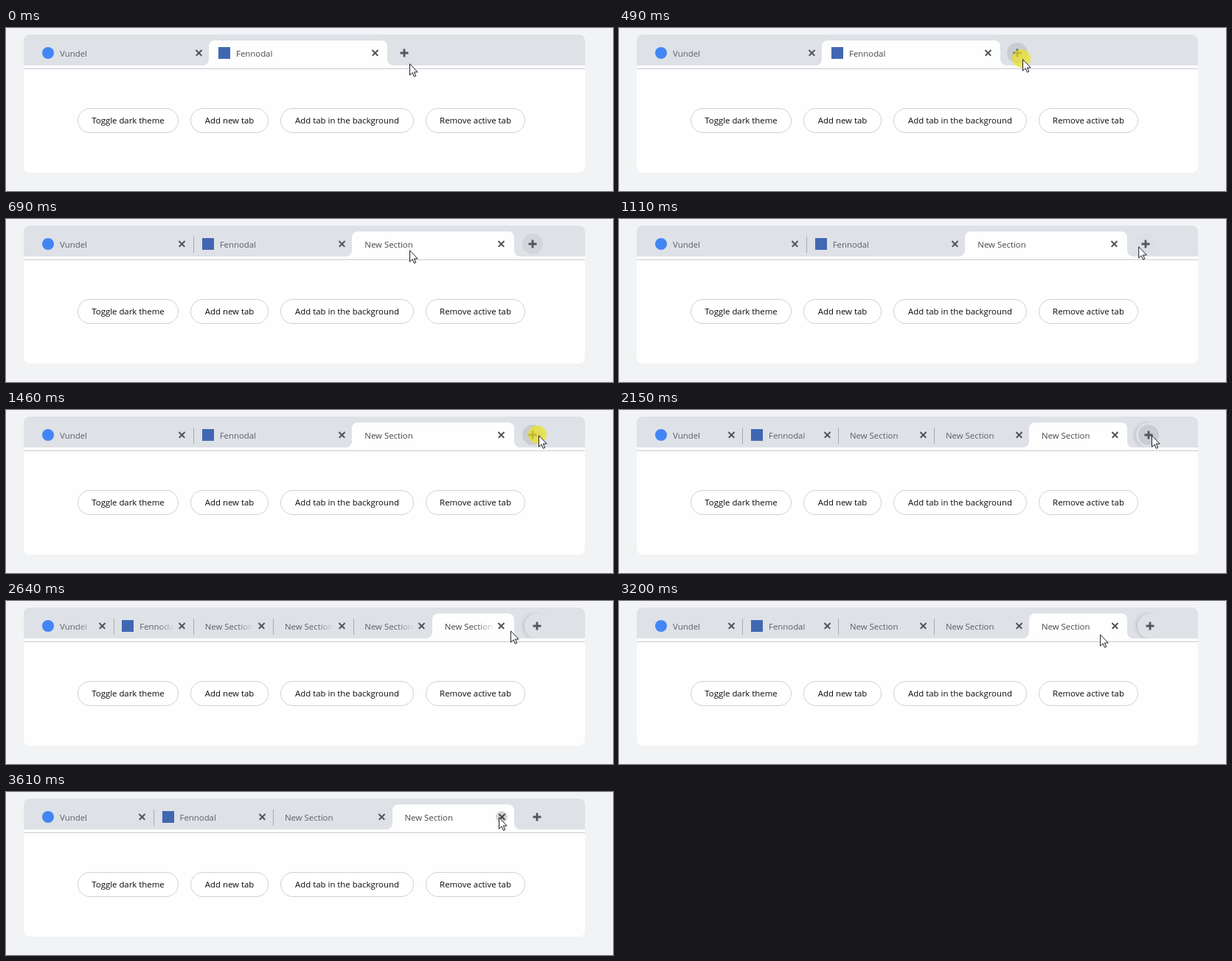
Recreate the animation shown at these times as an HTML page. Size 823 by 222 pixels, loop 3680 ms.

```html
<!DOCTYPE html>
<html lang="en">
<head>
<meta charset="utf-8">
<title>Browser tabs</title>
<style>
  @property --n { syntax: "<number>"; inherits: true; initial-value: 2; }
  @property --rise { syntax: "<length>"; inherits: true; initial-value: 0px; }

  :root { --loop: 3680ms infinite; --bar: #dee1e6; }
  html, body { margin: 0; width: 100%; height: 100%; overflow: hidden; background: #f2f3f5; }
  .stage {
    position: relative; width: 823px; height: 222px; overflow: hidden;
    font: 11.4px "Open Sans", "Noto Sans", sans-serif;
    animation: count var(--loop) step-end, rise var(--loop) linear;
  }
  .stage * { position: absolute; box-sizing: border-box; }

  .panel { left: 24px; top: 9px; width: 761px; height: 188px; border-radius: 8px; background: #fefefe; }
  .bar { left: 24px; top: 9px; width: 761px; height: 42px; border-radius: 8px 8px 0 0; background: var(--bar); }
  .line { left: 24px; top: 55px; width: 761px; height: 1px; background: #c9ccd0; }
  .strip { left: 0; top: 0; width: 823px; height: 51px; overflow: hidden; }

  /* --n tabs share the strip; the last one is always active */
  .tab {
    --s: min(239px, calc(650px / var(--n)));
    --on: clamp(0, 2 + var(--i) - var(--n), 1);
    left: calc(36px + var(--i) * var(--s)); top: 17px;
    width: calc(var(--s) + 3px); height: 34px;
    opacity: clamp(0, var(--n) - var(--i), 1);
    transform: translateY(calc(var(--on) * var(--rise)));
  }
  .bg { inset: 0; border-radius: 8px 8px 0 0; background: #fefefe; opacity: var(--on); }
  .bg::before, .bg::after {
    content: ""; position: absolute; bottom: 0; width: 8px; height: 8px;
    background: radial-gradient(circle at 0 0, transparent 7.5px, #fefefe 8.2px);
  }
  .bg::before { left: -8px; }
  .bg::after { right: -8px; transform: scaleX(-1); }
  .sep {
    left: calc(var(--s) + 1.3px); top: 7px; width: 1px; height: 22px; background: #a7abaf;
    opacity: clamp(0, var(--n) - 2 - var(--i), 1);
  }
  .label {
    --x: 17px;
    left: var(--x); top: .5px; width: calc(var(--s) - 24px - var(--x)); height: 34px;
    line-height: 34px; white-space: nowrap; overflow: hidden;
    color: rgb(calc(92 - 23 * var(--on)), calc(95 - 24 * var(--on)), calc(100 - 26 * var(--on)));
    -webkit-mask-image: linear-gradient(90deg, #000 calc(100% - 24px), transparent);
    mask-image: linear-gradient(90deg, #000 calc(100% - 24px), transparent);
  }
  .icon + .label { --x: 37px; }
  .icon { left: 13px; top: 9px; width: 16px; height: 16px; }
  .round { border-radius: 50%; background: #4285f4; }
  .square { background: #4267b2; }
  .x { left: calc(var(--s) - 14px); top: 17px; }
  .x::before, .x::after {
    content: ""; position: absolute; left: -5.5px; top: -.75px;
    width: 11px; height: 1.5px; background: #505357; transform: rotate(45deg);
  }
  .x::after { transform: rotate(-45deg); }

  .plus { top: 34px; animation: plus var(--loop) step-end; }
  .plus svg { left: -6px; top: -6px; }
  .halo {
    left: -17px; top: -17px; width: 34px; height: 34px; border-radius: 50%;
    background: var(--bar); box-shadow: -3px 0 4px rgba(0, 0, 0, .11);
    animation: halo var(--loop) step-end;
  }
  .hover {
    left: -14px; top: -14px; width: 28px; height: 28px; border-radius: 50%;
    background: rgba(0, 0, 0, .09); animation: hover var(--loop) linear;
  }
  .shut {
    left: 664px; top: 26px; width: 16px; height: 16px; border-radius: 50%;
    background: rgba(0, 0, 0, .16); animation: shut var(--loop) step-end;
  }

  .btn {
    top: 109px; height: 34px; line-height: 32px; border: 1px solid #d0d0d8; border-radius: 17px;
    background: #fff; color: #0a0a0a; text-align: center; white-space: nowrap;
  }

  .cursor { left: 0; top: 0; animation: move var(--loop) linear; }
  .cursor svg { left: 0; top: 0; overflow: visible; }
  .click {
    left: -14px; top: -13px; width: 25px; height: 25px; border-radius: 50%;
    background: rgba(236, 228, 30, .7); animation: click var(--loop) step-end;
  }

  @keyframes count {
    0% { --n: 2; } 14.67% { --n: 3; } 43.21% { --n: 4; } 54.62% { --n: 5; }
    61.96% { --n: 6; } 77.17% { --n: 5; } 97.83%, 100% { --n: 4; }
  }
  @keyframes rise {
    0%, 14.66%, 17.93%, 43.2%, 46.47%, 54.61%, 57.88%, 61.95%, 65.22%, 100% { --rise: 0px; }
    14.67%, 43.21%, 54.62%, 61.96% { --rise: 10px; }
  }
  @keyframes plus {
    0% { left: 540px; } 16.58% { left: 714px; } 45.11% { left: 716px; }
    56.25% { left: 718px; } 63.86%, 100% { left: 720px; }
  }
  @keyframes halo { 0%, 97.83%, 100% { opacity: 0; } 56.25% { opacity: 1; } }
  @keyframes hover {
    0%, 2.72%, 21.74%, 29.9%, 67.9%, 100% { opacity: 0; }
    5.43%, 16.58%, 32.6%, 65.2% { opacity: 1; }
  }
  @keyframes shut { 0%, 78.5% { opacity: 0; } 73.9%, 91.5%, 100% { opacity: 1; } }
  @keyframes click {
    0%, 14.67%, 42.9%, 56.25%, 63.6%, 77.17%, 97.83%, 100% { opacity: 0; }
    9.5%, 37.5%, 52.7%, 60%, 73.4%, 93.5% { opacity: 1; }
  }
  @keyframes move {
    0%, 1% { transform: translate(547px, 48px); }
    8.15%, 17.4%, 18.9% { transform: translate(547px, 42px); }
    20.65% { transform: translate(556px, 44px); }
    24.46% { transform: translate(604px, 44px); }
    26.4% { transform: translate(639px, 43px); }
    30.16% { transform: translate(704px, 37px); }
    33.97% { transform: translate(720px, 34px); }
    37.8%, 64.13% { transform: translate(722px, 34px); }
    66.03% { transform: translate(714px, 44px); }
    67.93% { transform: translate(704px, 47px); }
    71.74% { transform: translate(684px, 40px); }
    74.46% { transform: translate(673px, 35px); }
    77.45% { transform: translate(672px, 35px); }
    81.1% { transform: translate(652px, 45px); }
    83.15% { transform: translate(653px, 44px); }
    85%, 86.96% { transform: translate(652px, 45px); }
    92.4% { transform: translate(671px, 36px); }
    94.3%, 96.2% { transform: translate(672px, 35px); }
    97.96%, 100% { transform: translate(668px, 34px); }
  }
</style>
</head>
<body>
<div class="stage">
  <div class="panel"></div>
  <div class="bar"></div>
  <div class="line"></div>

  <div class="strip">
    <div class="plus">
      <div class="halo"></div>
      <div class="hover"></div>
      <svg width="12" height="12" viewBox="-6 -6 12 12"><path d="M-5.5 0H5.5M0-5.5V5.5" stroke="#54575b" stroke-width="2.8"/></svg>
    </div>
    <div class="tab" style="--i:0"><div class="bg"></div><div class="icon round"></div><div class="label">Vundel</div><div class="x"></div><div class="sep"></div></div>
    <div class="tab" style="--i:1"><div class="bg"></div><div class="icon square"></div><div class="label">Fennodal</div><div class="x"></div><div class="sep"></div></div>
    <div class="tab" style="--i:2"><div class="bg"></div><div class="label">New Section</div><div class="x"></div><div class="sep"></div></div>
    <div class="tab" style="--i:3"><div class="bg"></div><div class="label">New Section</div><div class="x"></div><div class="sep"></div></div>
    <div class="tab" style="--i:4"><div class="bg"></div><div class="label">New Section</div><div class="x"></div><div class="sep"></div></div>
    <div class="tab" style="--i:5"><div class="bg"></div><div class="label">New Section</div><div class="x"></div><div class="sep"></div></div>
    <div class="shut"></div>
  </div>

  <div class="btn" style="left:97px;width:137px">Toggle dark theme</div>
  <div class="btn" style="left:250px;width:106px">Add new tab</div>
  <div class="btn" style="left:372px;width:181px">Add tab in the background</div>
  <div class="btn" style="left:569px;width:135px">Remove active tab</div>

  <div class="cursor">
    <div class="click"></div>
    <svg width="12" height="19"><path d="M.5.8V16.2L4.1 12.8 6.4 18.3 8.7 17.3 6.4 12H11.2Z" fill="#fff" stroke="#1c1a24"/></svg>
  </div>
</div>
</body>
</html>
```
